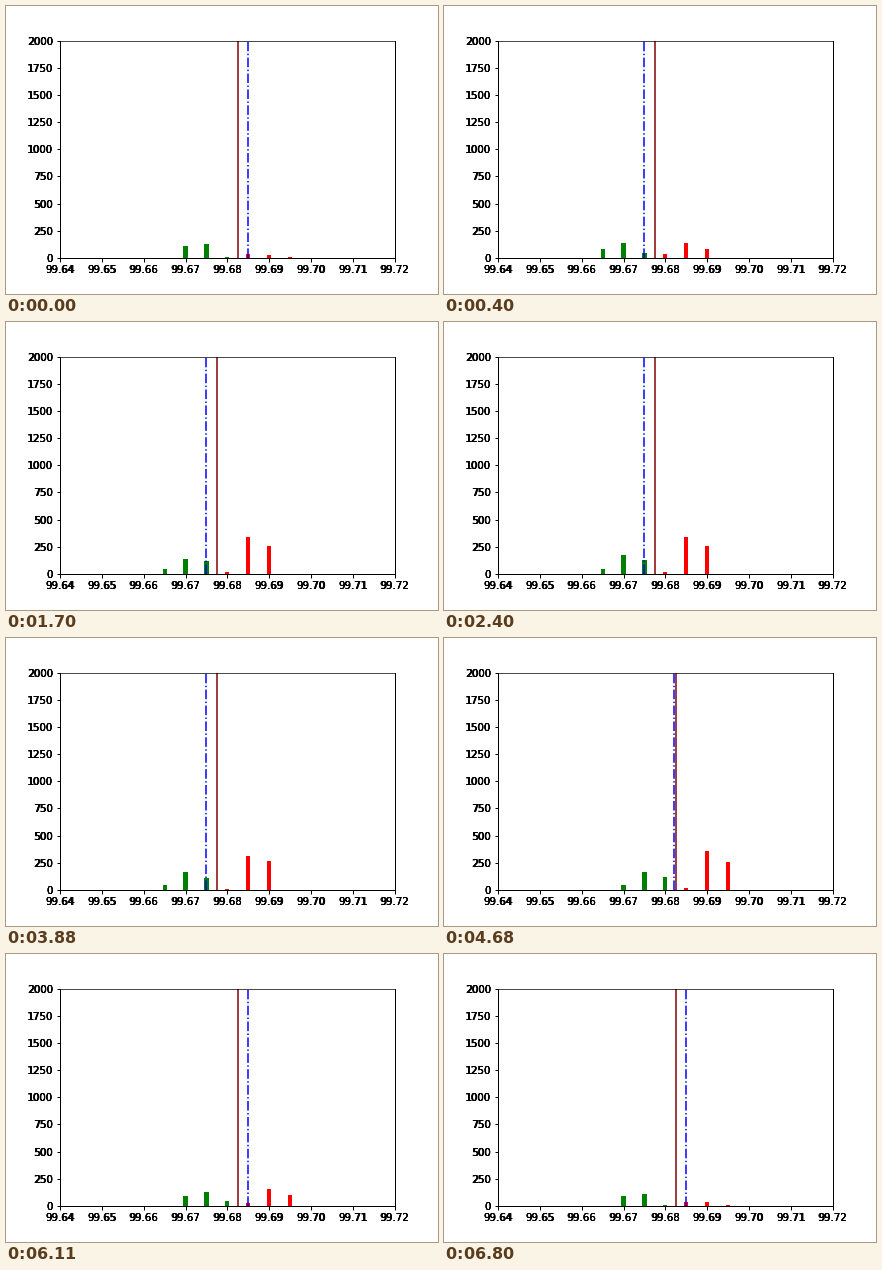
A matplotlib script for the animation above (6860 ms loop, 432x288 px).

```python
import numpy as np
import matplotlib.pyplot as plt
from matplotlib.animation import FuncAnimation

LOOP, STEP = 6860, 20
BAR_WIDTH = 0.001

# the book updates every 100 ms, and the beat restarts at these times
RESTARTS = [0, 2430, 2910, 2980, 4710, 6400, LOOP]
TICKS = np.concatenate([np.arange(a, b, 100)
                        for a, b in zip(RESTARTS, RESTARTS[1:])])

# time (ms), mid price, last trade
QUOTES = [
    (0, 99.6825, 99.685), (300, 99.6775, 99.675), (500, 99.6725, 99.67),
    (900, 99.6775, 99.675), (4080, 99.6825, 99.682), (4810, 99.6825, 99.685),
    (5310, 99.6875, 99.685), (6100, 99.6825, 99.685),
]

# three bids and three asks, from the mid price outwards
OFFSETS = 0.0025 + 0.005 * np.arange(3)
OFFSETS = np.concatenate([-OFFSETS, OFFSETS])
QUIET = np.array([5, 130, 100, 40, 30, 10])
BUSY = np.array([115, 150, 45, 15, 350, 240])


def build_sizes():
    """Order sizes per update: trade swells after the start and fades late."""
    rng = np.random.default_rng(4)
    swell = np.interp(TICKS, [0, 1100, 5500, 6500], [0, 1, 1, 0])[:, None]
    sizes = QUIET + (BUSY - QUIET) * swell
    return sizes * rng.uniform(0.85, 1.15, sizes.shape)


SIZES = build_sizes()

fig, ax = plt.subplots(figsize=(6, 4), dpi=72)
fig.subplots_adjust(left=0.125, right=0.9, bottom=0.125, top=0.88)
xticks = np.linspace(99.64, 99.72, 9)
yticks = np.arange(0, 2001, 250)
ax.set_xticks(xticks)
ax.set_yticks(yticks)
ax.tick_params(width=1, labelbottom=False, labelleft=False)
ax.spines[:].set_linewidth(1)
ax.spines["top"].set_linewidth(0.7)


def label(x, y, text, axis_transform):
    """Stack two sizes of the same label to get its heavy, doubled look."""
    trans, va, ha = axis_transform
    for size in (10, 10, 10.4, 10.4):
        ax.text(x, y, text, transform=trans, va=va, ha=ha,
                fontsize=size, family="DejaVu Sans")


for x in xticks:
    label(x, 0, f"{x:.2f}", ax.get_xaxis_text1_transform(7))
for y in yticks:
    label(0, y, str(y), ax.get_yaxis_text1_transform(7))

colors = ["green"] * 3 + ["red"] * 3
bars = ax.bar(QUOTES[0][1] + OFFSETS, SIZES[0], width=BAR_WIDTH, color=colors)
mid_line = ax.axvline(QUOTES[0][1], color="maroon", lw=1.5)
last_line = ax.axvline(QUOTES[0][2], color="blue", lw=1.5, ls="-.")
ax.set(xlim=(99.64, 99.72), ylim=(0, 2000))


def update(i):
    t = i * STEP + STEP / 2
    n = np.searchsorted(TICKS, t, side="right") - 1
    _, mid, last = [q for q in QUOTES if q[0] <= TICKS[n]][-1]
    for bar, offset, size in zip(bars, OFFSETS, SIZES[n]):
        bar.set_x(mid + offset - BAR_WIDTH / 2)
        bar.set_height(size)
    mid_line.set_xdata([mid, mid])
    last_line.set_xdata([last, last])
    return [*bars, mid_line, last_line]


anim = FuncAnimation(fig, update, frames=LOOP // STEP, interval=STEP,
                     repeat=True, repeat_delay=0)
plt.show()
```
